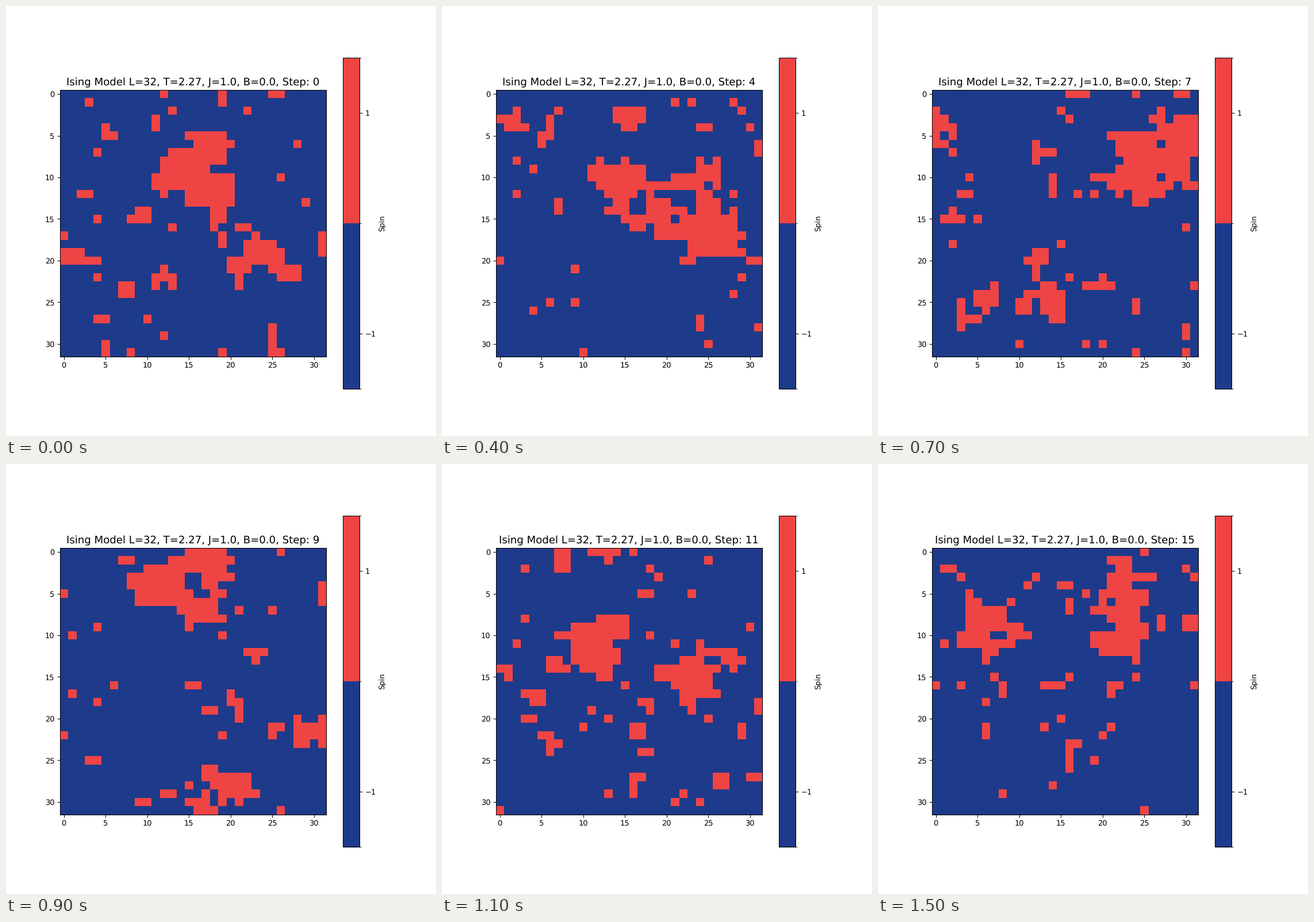
A matplotlib script that plays this animation: 748 by 748 pixels, repeating every 1600 ms.

```python
import numpy as np
import matplotlib.pyplot as plt
from matplotlib.animation import FuncAnimation
from matplotlib.colors import BoundaryNorm, ListedColormap

SIZE = 32
TEMP, COUPLING, FIELD = 2.27, 1.0, 0.0
STEPS = 16
SWEEPS = 4
DPI = 93.5

# Paths of the two largest up-spin clusters
KEY_STEPS = [0, 4, 7, 9, 11, 13, 15]
MAIN_X = [17, 16, 25, 14, 11, 3, 6]
MAIN_Y = [10, 12, 8, 4, 11, 15, 10]
SIDE_X = [24, 25, 13, 20, 23, 23, 22]
SIDE_Y = [19, 16, 25, 28, 16, 22, 9]

rows, cols = np.indices((SIZE, SIZE))
parity = (rows + cols) % 2


def disc(step, xs, ys, radius):
    """Sites within radius of the path, wrapped at the edges."""
    half = SIZE / 2
    dx = (cols - np.interp(step, KEY_STEPS, xs) + half) % SIZE - half
    dy = (rows - np.interp(step, KEY_STEPS, ys) + half) % SIZE - half
    return np.hypot(dx, dy) < radius


def heat_bath(spins, rng):
    """One checkerboard sweep with periodic edges."""
    for color in (0, 1):
        near = sum(np.roll(spins, d, axis) for d in (-1, 1) for axis in (0, 1))
        p_up = 1 / (1 + np.exp(-2 * (COUPLING * near + FIELD) / TEMP))
        fresh = np.where(rng.random(spins.shape) < p_up, 1, -1)
        spins = np.where(parity == color, fresh, spins)
    return spins


def lattice(step):
    rng = np.random.default_rng(100 + step)
    up = disc(step, MAIN_X, MAIN_Y, 4.5) | disc(step, SIDE_X, SIDE_Y, 3.2)
    spins = np.where(up, 1, -1)
    for _ in range(SWEEPS):
        spins = heat_bath(spins, rng)
    return spins


def title(step):
    return (f"Ising Model L={SIZE}, T={TEMP}, J={COUPLING}, "
            f"B={FIELD}, Step: {step}")


states = [lattice(step) for step in range(STEPS)]

plt.rcParams["text.hinting"] = "no_hinting"
fig, ax = plt.subplots(figsize=(748 / DPI, 748 / DPI), dpi=DPI)
cmap = ListedColormap(["#1e3a8a", "#ef4444"])
norm = BoundaryNorm([-1.5, 0, 1.5], cmap.N)
image = ax.imshow(states[0], cmap=cmap, norm=norm, interpolation="nearest")
bar = fig.colorbar(image, ax=ax, ticks=[-1, 1])
bar.set_label("Spin")
heading = ax.set_title(title(0), fontsize=14)


def update(step):
    image.set_data(states[step])
    heading.set_text(title(step))
    return image, heading


anim = FuncAnimation(fig, update, frames=STEPS, interval=100,
                     repeat=True, repeat_delay=0, blit=False)
plt.show()
```
